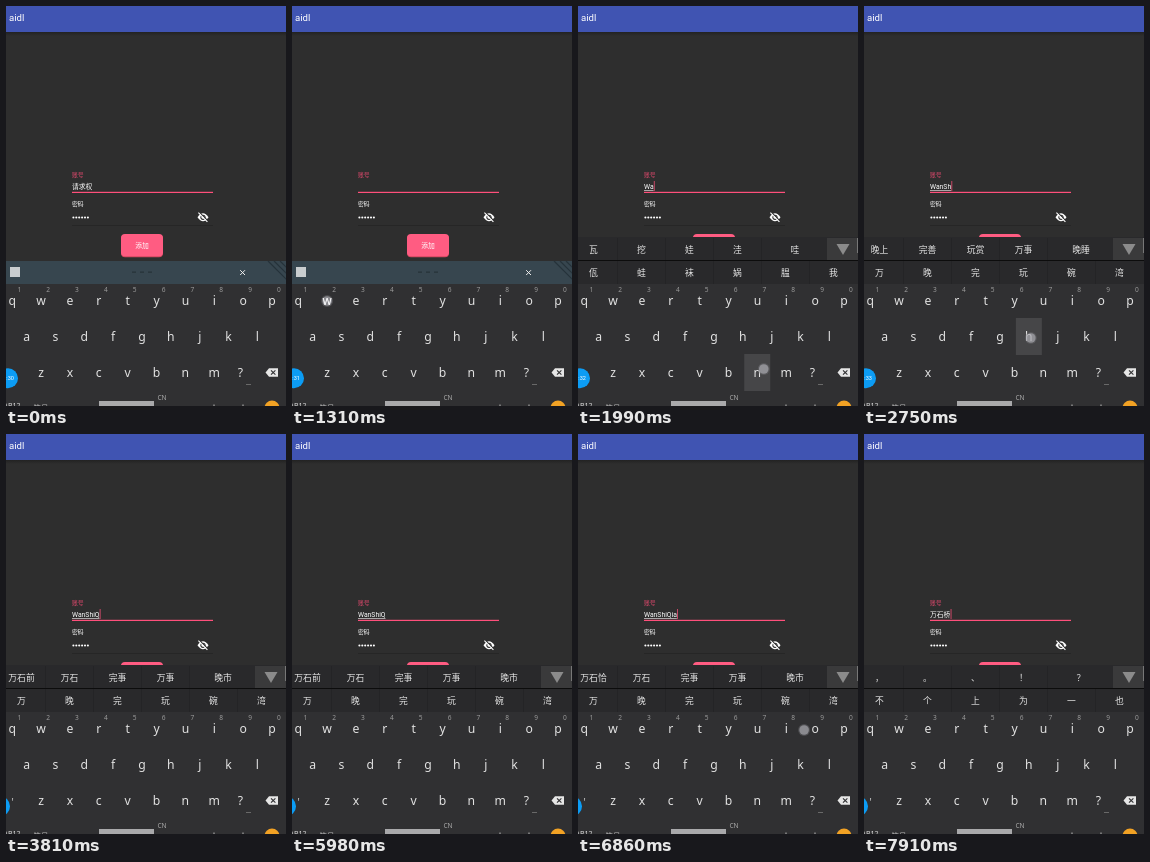
Write an HTML page with a canvas that moves like this. It is 280 px wide and 400 px high and loops after 8000 ms.

```html
<!DOCTYPE html>
<html lang="zh-CN">
<head>
<meta charset="utf-8">
<style>
html, body { margin: 0; width: 100%; height: 100%; overflow: hidden; background: #2e2e2e; }
canvas { display: block; width: 280px; height: 400px; }
</style>
</head>
<body>
<canvas id="stage" width="280" height="400"></canvas>
<script>
const g = document.getElementById('stage').getContext('2d');
const LOOP = 8000, PINK = '#ff4f7b';
const CJK = '"Noto Sans CJK SC", "Noto Sans CJK", sans-serif';
const LATIN = 'Roboto, ' + CJK;
const KEYS = '"Noto Sans", "Open Sans", sans-serif';

// Time, field text, first and second candidate row
const WAN = '万 晚 完 玩 碗 湾';
const edits = [
  [0, '请求权'],
  [40, '请求'],
  [430, '请'],
  [770, ''],
  [1430, 'W', '我 无 为 玩 完', '晚 外 文 五 万 问'],
  [1710, 'Wa', '瓦 挖 娃 洼 哇', '佤 蛙 袜 娲 腽 我'],
  [2190, 'Wan', '玩 晚 完 碗 万', '湾 弯 丸 挽 顽 婉'],
  [2450, 'WanS', '晚上 万岁 玩耍 完善 晚睡', WAN],
  [2740, 'WanSh', '晚上 完善 玩赏 万事 晚睡', WAN],
  [3120, 'WanShi', '万石 万事 完事 晚市 玩世', WAN],
  [3520, 'WanShiQ', '万石前 万石 完事 万事 晚市', WAN],
  [3975, 'WanShiQ', '万石前 万石 完事 万事 晚市', WAN],
  [6120, 'WanShiQi', '万石其 万石 完事 万事 晚市', WAN],
  [6460, 'WanShiQia', '万石恰 万石 完事 万事 晚市', WAN],
  [6960, 'WanShiQiao', '万石桥 万石 完事 万事 晚市', WAN],
  [7670, '万石桥', '， 。 、 ！ ？', '不 个 上 为 一 也']
];

const keys = {};
const addRow = (letters, x, y) =>
  [...letters].forEach((c, i) => keys[c] = [x + i * 28.85, y]);
addRow('qwertyuiop', 6.3, 295);
addRow('asdfghjkl', 20.6, 331);
addRow('zxcvbnm', 35, 367);
const ERASE = '⌫';
keys[ERASE] = [266, 367];

// Start, end, key, finger offset from the key centre
const taps = [
  [40, 900, ERASE, 0, 0], [1300, 1470, 'w', 0, 0], [1600, 1790, 'a', 2, 0],
  [1920, 2110, 'n', 6.5, -4], [2330, 2500, 's', 3, 0], [2610, 2780, 'h', 2, 1],
  [3000, 3170, 'i', 0, 1], [3400, 3580, 'q', 4, 0], [6000, 6170, 'i', 2, 1],
  [6340, 6510, 'a', 2, 1], [6820, 7010, 'o', -11, 1], [7490, 7720, '', 16, 243]
];

function text(s, x, y, size, color, align = 'center', family = CJK) {
  g.font = size + 'px ' + family;
  g.fillStyle = color;
  g.textAlign = align;
  g.fillText(s, x, y);
}

function rect(x, y, w, h, color) {
  g.fillStyle = color;
  g.fillRect(x, y, w, h);
}

function disc(x, y, r, color) {
  g.fillStyle = color;
  g.beginPath();
  g.arc(x, y, r, 0, 7);
  g.fill();
}

function line(color, width, ...pts) {
  g.strokeStyle = color;
  g.lineWidth = width;
  g.beginPath();
  for (let i = 0; i < pts.length; i += 2) g.lineTo(pts[i], pts[i + 1]);
  g.stroke();
}

function poly(color, ...pts) {
  g.fillStyle = color;
  g.beginPath();
  for (let i = 0; i < pts.length; i += 2) g.lineTo(pts[i], pts[i + 1]);
  g.fill();
}

function eyeOff(x, y) {
  g.fillStyle = '#fff';
  g.beginPath();
  g.moveTo(x - 5.5, y);
  g.quadraticCurveTo(x, y - 8, x + 5.5, y);
  g.quadraticCurveTo(x, y + 8, x - 5.5, y);
  g.fill();
  disc(x, y, 2.6, '#2e2e2e');
  disc(x, y, 1.5, '#fff');
  line('#2e2e2e', 1.2, x - 3.6, y - 5, x + 5.2, y + 3.8);
  line('#fff', 1.1, x - 4.6, y - 4.6, x + 4.4, y + 4.6);
}

function form(edit, t) {
  rect(0, 0, 280, 400, '#2e2e2e');
  const shade = g.createLinearGradient(0, 26, 0, 30);
  shade.addColorStop(0, '#222');
  shade.addColorStop(1, '#2e2e2e');
  rect(0, 26, 280, 4, shade);
  rect(0, 0, 280, 26, '#4054b2');
  text('aidl', 3, 15, 9.6, '#fff', 'left', '500 Roboto, sans-serif'.slice(4));

  text('账号', 66, 171.2, 5.8, '#e84a70', 'left');
  const value = edit[1], composing = /[a-z]/i.test(value);
  text(value, 66, 183, 6.8, '#fff', 'left', LATIN);
  const end = 66 + g.measureText(value).width;
  if (composing) rect(66, 184, end - 66, 0.7, '#ddd');
  const blink = Math.floor((t - edit[0]) / 507) % 2 === 0;
  if (edit[0] && blink && (value || t < 970)) rect(end + 0.2, 175, 0.9, 10, '#d84a6c');
  rect(66, 185.8, 141, 1.2, PINK);

  text('密码', 66, 200.3, 5.8, '#fff', 'left');
  for (let i = 0; i < 6; i++) disc(67.4 + i * 2.9, 211.5, 1.05, '#fff');
  eyeOff(197, 211.3);
  rect(66, 219, 141, 0.6, '#222');

  g.beginPath();
  g.roundRect(115, 228.8, 42, 22.4, 4);
  g.fillStyle = '#d2485f';
  g.fill();
  g.beginPath();
  g.roundRect(115, 228, 42, 22.2, 4);
  g.fillStyle = '#ff5c82';
  g.fill();
  text('添加', 136, 242, 6.8, '#fff');
}

function toolbar() {
  rect(0, 255, 280, 23, '#37464f');
  rect(4, 261, 10, 10, '#c9cdcf');
  for (let i = 0; i < 3; i++) {
    rect(126 + i * 8, 265.6, 4, 1, '#222d33');
    line('#26323a', 1.2, 262 + i * 6, 255, 285 + i * 6, 278);
  }
  line('#eee', 1, 234.2, 264.2, 239, 269);
  line('#eee', 1, 239, 264.2, 234.2, 269);
}

function candidates(first, second) {
  rect(0, 231, 280, 47, '#29292b');
  rect(0, 254, 280, 1, '#0c0c0c');
  [39, 87, 135, 183].forEach(x => rect(x, 232, 0.6, 22, '#222224'));
  [39, 87, 135, 183, 231].forEach(x => rect(x, 255, 0.6, 23, '#222224'));
  rect(249, 232, 31, 22, '#3a3a3b');
  rect(279, 232, 1, 15, '#777');
  poly('#8b8b8b', 258.5, 238, 271.5, 238, 265, 249);
  first.split(' ').forEach((s, i) => text(s, i < 4 ? 15.5 + i * 48 : 217, 246.6, 8.8, '#e4e4e4'));
  second.split(' ').forEach((s, i) => text(s, 15.5 + i * 48, 269.6, 8.8, '#e4e4e4'));
}

function keyboard(t) {
  rect(0, 278, 280, 122, '#303032');
  for (const [from, to, key] of taps)
    if (key && t >= from + (key === ERASE ? 0 : 50) && t < to) {
      const [x, y] = keys[key];
      rect(x - 13, y - 19, 26, 37, '#464648');
    }
  for (const c in keys)
    if (c !== ERASE) text(c, keys[c][0], keys[c][1] + 4, 12.2, '#e2e2e2', 'center', KEYS);
  for (let i = 0; i < 10; i++)
    text((i + 1) % 10, 13.3 + i * 28.85, 285.6, 6.6, '#9a9a9a', 'center', KEYS);
  text('?', 234.5, 371, 12.2, '#e2e2e2', 'center', KEYS);
  rect(240, 378, 5, 0.8, '#777');
  text("'", 6.5, 372, 10, '#ccc', 'center', KEYS);

  poly('#e6e6e6', 259.5, 366.5, 263, 362.3, 272, 362.3, 272, 370.7, 263, 370.7);
  line('#303032', 1.1, 265, 364.3, 269.4, 368.7);
  line('#303032', 1.1, 269.4, 364.3, 265, 368.7);

  text('AB12', 6, 402, 7, '#ddd', 'center', KEYS);
  text('符号', 35, 404.5, 7.5, '#bbb');
  text('CN', 156, 394.2, 6.6, '#aaa', 'center', KEYS);
  rect(93, 395, 55, 5, '#a9a9ab');
  rect(207.5, 398.5, 1, 1.5, '#bbb');
  rect(236.5, 398.5, 1, 1.5, '#bbb');
  disc(266, 402, 7.5, '#f2a224');
}

function ball(t) {
  const p = Math.min(1, Math.max(0, (t - 3400) / 300));
  const x = 2 - 8 * p * p * (3 - 2 * p);
  disc(x, 372.3, 10, '#0c9cf4');
  if (p < 1) text('00:' + (30 + Math.floor((t + 570) / 1000)), x - 1, 374.4, 5.6, '#fff', 'center', LATIN);
}

function fingers(t) {
  for (const [from, to, key, dx, dy] of taps) {
    if (t < from || t > to + 80) continue;
    const [x, y] = keys[key] || [0, 0];
    g.globalAlpha = t < to ? 1 : 1 - (t - to) / 80;
    disc(x + dx, y + dy, 6, 'rgba(110,110,115,.45)');
    disc(x + dx, y + dy, 4.8, 'rgba(200,200,208,.5)');
    if (key === 'w') text('W', x, y + 4, 9.5, '#fff', 'center', KEYS);
    g.globalAlpha = 1;
  }
}

function draw(now) {
  const t = now % LOOP;
  const edit = edits.filter(e => e[0] <= t).pop();
  form(edit, t);
  if (edit[2]) candidates(edit[2], edit[3]);
  else toolbar();
  keyboard(t);
  ball(t);
  fingers(t);
}

const start = performance.now();
function tick() {
  draw(performance.now() - start);
  requestAnimationFrame(tick);
}
tick();
</script>
</body>
</html>
```
